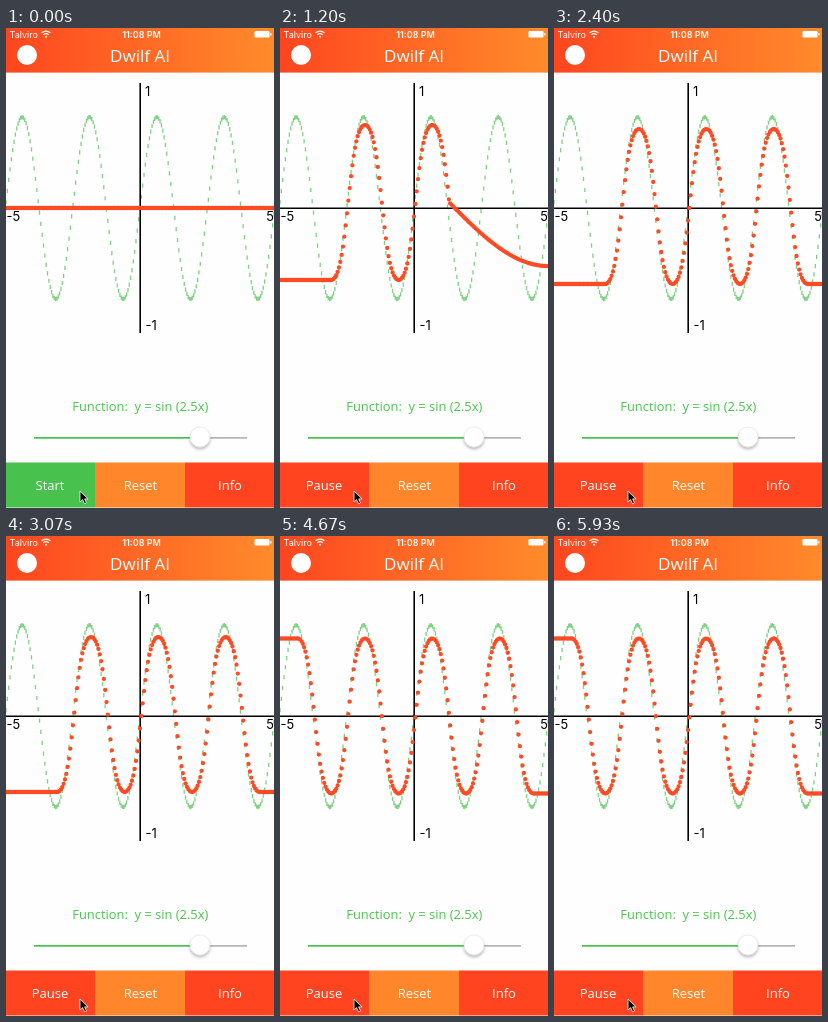
An HTML page that plays this animation: 268x480 px, repeating every 5990 ms.

```html
<!DOCTYPE html>
<html lang="en">
<head>
<meta charset="utf-8">
<title>Curve fitting</title>
<style>
  html, body { margin: 0; width: 100%; height: 100%; overflow: hidden; background: #fefefe; }
  svg { display: block; width: 100%; height: 100%; }
  text { white-space: pre; }
  .ui { font-family: "Open Sans", "Noto Sans", sans-serif; fill: #fff; text-anchor: middle; }
  .button { font-size: 13px; }
  .label { font: 13px Inter, "Liberation Sans", sans-serif; }
  .status { font: 9px Inter, "Liberation Sans", sans-serif; fill: #fff; }
  .clock { font-weight: 600; text-anchor: middle; }
</style>
</head>
<body>
<svg viewBox="0 0 268 480">
  <defs>
    <linearGradient id="bar">
      <stop offset="0" stop-color="#ff461f"/>
      <stop offset="1" stop-color="#ff8b2b"/>
    </linearGradient>
    <filter id="shadow" x="-50%" y="-50%" width="200%" height="200%">
      <feDropShadow dx="0" dy="2" stdDeviation="1.6" flood-opacity=".3"/>
    </filter>
  </defs>

  <rect width="268" height="44.6" fill="url(#bar)"/>
  <text class="status" x="3.5" y="9.5">Talviro</text>
  <g fill="none" stroke="#fff" stroke-width="1.2">
    <path d="M35.5 4.8q4.5-3.4 9 0M37.2 6.8q2.8-2.2 5.6 0"/>
    <path d="M40 8.7h.01" stroke-width="2" stroke-linecap="round"/>
  </g>
  <text class="status clock" x="135.5" y="9.5">11:08 PM</text>
  <rect x="248.5" y="3" width="15" height="6.5" rx="1.2" fill="#fff"/>
  <rect x="264.3" y="5" width="1.2" height="2.5" rx=".5" fill="#fff"/>
  <circle cx="21" cy="27" r="10" fill="#fff"/>
  <text class="ui" x="134" y="33.5" font-size="17">Dwilf AI</text>

  <path id="goal" fill="none" stroke="#7fd083" stroke-width="1.3"/>
  <path d="M0 180.2H268M134.2 55V305" stroke="#000" stroke-width="1.6"/>
  <text class="label" x="139" y="67.5">1</text>
  <text class="label" x="139.5" y="302">-1</text>
  <text class="label" x=".5" y="193">-5</text>
  <text class="label" x="268" y="193" text-anchor="end">5</text>
  <path id="fit" fill="none" stroke="#ff4a24" stroke-width="4.3" stroke-linecap="round"/>

  <text class="ui" x="134.3" y="383" font-size="12.9" style="fill:#4cc350">Function:  y = sin (2.5x)</text>
  <path d="M194 409.8H241" stroke="#b9b4b4" stroke-width="1.8"/>
  <path d="M28 409.8H194" stroke="#4cc350" stroke-width="1.8"/>
  <circle cx="194" cy="409" r="10" fill="#fff" stroke="#ddd" stroke-width=".5" filter="url(#shadow)"/>

  <rect id="runBox" y="434.5" width="89" height="45"/>
  <rect x="89" y="434.5" width="90" height="45" fill="#ff862b"/>
  <rect x="179" y="434.5" width="89" height="45" fill="#ff441f"/>
  <text id="runText" class="ui button" x="44" y="462"></text>
  <text class="ui button" x="134.5" y="462">Reset</text>
  <text class="ui button" x="224" y="462">Info</text>
  <path d="M74 463v11l2.6-2.4 1.9 4.2 2-.9-1.9-4h3.5z" stroke="#fff" stroke-width=".8"/>
</svg>

<script>
  const LOOP = 5990, ZERO = 180, UNIT = 26.8;
  const HALF = Math.PI / 2.5 * UNIT;      // half a period in pixels
  const RISE = 135.5;                     // where the fitted wave rises through its middle
  const FALL = RISE + HALF;
  const LEFT_DIP = RISE - 2.5 * HALF, LEFT_PEAK = LEFT_DIP - HALF;
  const RIGHT_DIP = RISE + 3.5 * HALF;

  const el = id => document.getElementById(id);
  const xs = Array.from({ length: 201 }, (_, i) => i * UNIT / 20);
  const ramp = (t, from, to) => Math.min(1, Math.max(0, (t - from) / (to - from)));
  const easeOut = u => 1 - (1 - u) ** 2;
  const smooth = u => u * u * (3 - 2 * u);

  // Sine with flattened peaks, as the network draws it.
  const wave = x => Math.tanh(Math.sin(Math.PI * (x - RISE) / HALF)) / Math.tanh(1);

  // The middle is learned first, then the right side, then the left.
  function fitAt(t) {
    const grow = easeOut(ramp(t, 0, 1200));
    const right = easeOut(ramp(t, 1200, 2100));
    const left = smooth(ramp(t, 3070, 4670));
    const mid = ZERO - 5.5 * grow + 4 * right + 1.5 * left;

    return x => {
      // Left of the dip the wave is stretched out, up to a flat line.
      let p = Math.min(x, RIGHT_DIP);
      if (x < LEFT_DIP) p = Math.max(LEFT_PEAK, LEFT_DIP - (LEFT_DIP - x) * left);
      let level = wave(p);
      if (x > FALL) {
        const slope = -.82 * Math.sin(Math.PI / 2 * (x - FALL) / (268 - FALL));
        level = slope + (level - slope) * right;
      }
      return mid - 77.5 * grow * level;
    };
  }

  // The picture advances fifteen times a second, on 10 ms marks.
  function snap(t) {
    const r = t % 200;
    return t - r + (r < 70 ? 0 : r < 130 ? 70 : 130);
  }

  function plot(id, f, mark) {
    el(id).setAttribute("d", xs.map(x => `M${x.toFixed(2)} ${f(x).toFixed(2)}${mark}`).join(""));
  }

  let shown = -1;
  function draw(t) {
    if (t === shown) return;
    shown = t;
    el("runText").textContent = t > 0 ? "Pause" : "Start";
    el("runBox").setAttribute("fill", t > 0 ? "#ff441f" : "#49c14d");
    plot("fit", fitAt(t), "h.01");
  }

  plot("goal", x => ZERO - 2 - 91 * Math.sin(2.5 * (x - 134) / UNIT), "v4.2");

  const start = performance.now();
  function tick() {
    draw(snap((performance.now() - start) % LOOP));
    requestAnimationFrame(tick);
  }
  draw(0);
  requestAnimationFrame(tick);
</script>
</body>
</html>
```
